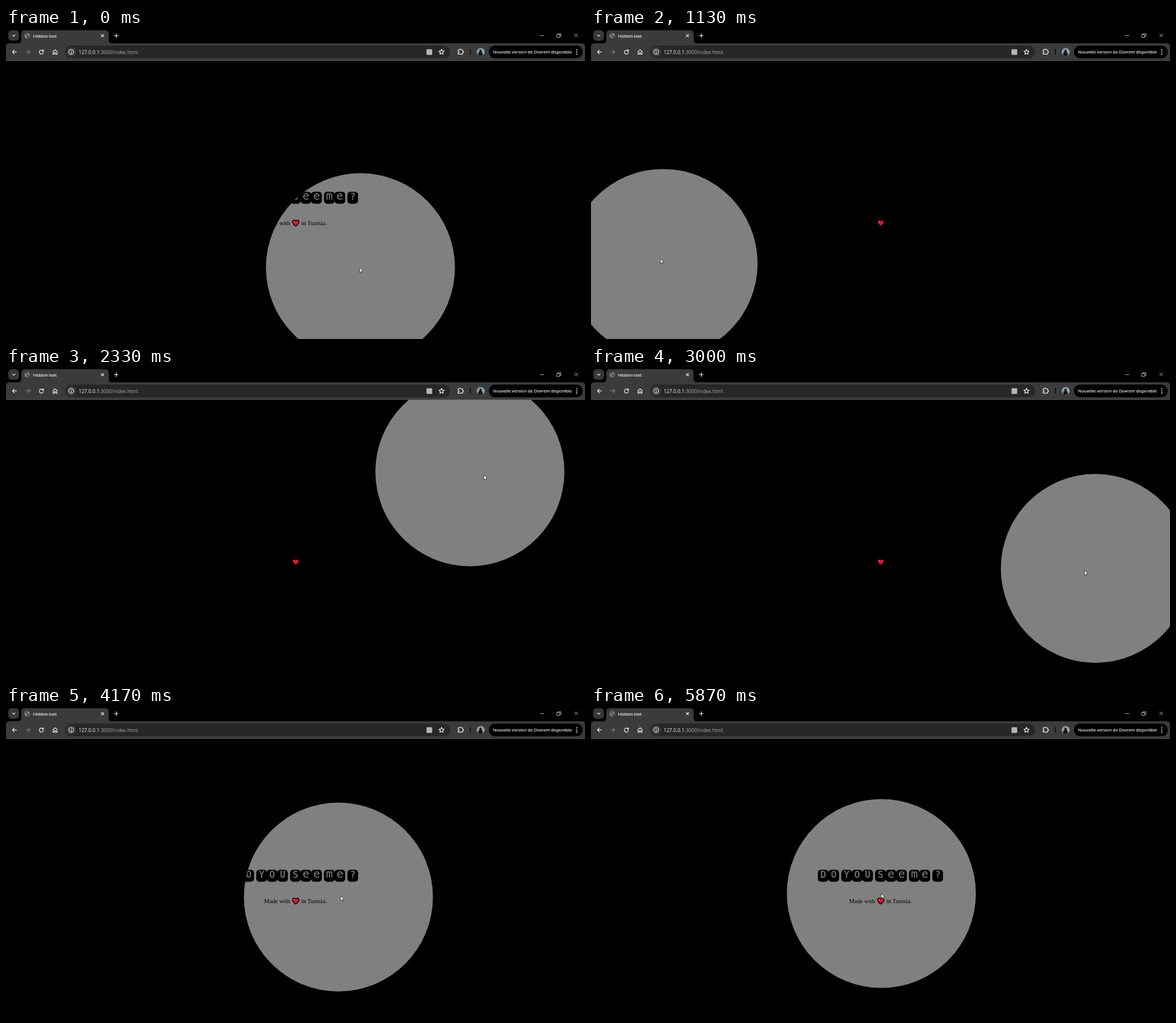
An HTML page that plays this animation: 1021 by 549 pixels, repeating every 5.91 s.

```html
<!DOCTYPE html>
<html lang="fr">
<head>
<meta charset="utf-8">
<title>Hidden-text</title>
<style>
  html, body { margin: 0; width: 100%; height: 100%; overflow: hidden; background: #000; }
  svg { display: block; }
  text { white-space: pre; }
  .ui { font-family: "Open Sans", "Noto Sans", sans-serif; font-size: 7.6px; fill: #fff; stroke: #fff; stroke-width: .15; }
  .url { font-size: 8.6px; fill: #a9acb0; stroke: none; }
  .made { font: 10.67px "Liberation Serif", serif; fill: #000; }
  .key { font: 16px "DejaVu Sans Mono", monospace; fill: #808080; stroke: #808080; stroke-width: .3; text-anchor: middle; }
  .low { font-size: 20px; stroke-width: 0; }
  .line { fill: none; stroke: #f1f1f1; stroke-width: 1.2; stroke-linecap: round; stroke-linejoin: round; }
  .thin { stroke: #ddd; stroke-width: .8; }
  .off { stroke: #7d7d7d; }
</style>
</head>
<body>
<svg width="1021" height="549" viewBox="0 0 1021 549">
  <defs>
    <clipPath id="spot"><circle id="hole" r="166.67"/></clipPath>
    <linearGradient id="photo" x2="1" y2="1">
      <stop offset="0" stop-color="#6f9a9c"/>
      <stop offset="1" stop-color="#a9a3ac"/>
    </linearGradient>
    <path id="heart" d="M511 349q-5-4-5-6.500c0-3 3.500-3.500 5-1c1.500-2.500 5-2 5 1q0 2.500-5 6.500z"/>
  </defs>

  <!-- page -->
  <rect width="1021" height="549"/>
  <g clip-path="url(#spot)">
    <rect width="1021" height="549" fill="#808080"/>
    <g id="title"></g>
    <text class="made" x="455" y="348">Made with</text>
    <text class="made" x="520.700" y="348">in Tunisia.</text>
    <use href="#heart" stroke="#000" stroke-width="2.800" stroke-linejoin="round"/>
  </g>
  <use href="#heart" fill="#e80f30"/>
  <circle cx="508.300" cy="342" r=".8" fill="#ff8fa0"/>

  <!-- tab strip -->
  <rect width="1021" height="58"/>
  <rect x="4" y="4" width="19" height="18.500" rx="6" fill="#38383a"/>
  <path class="line" d="M11.300 12.300l2.300 2.300l2.300-2.300"/>
  <path fill="#3b3b3c" d="M0 57V33q0-6 6-6h15q6 0 6-6V10q0-6 6-6h142q6 0 6 6v11q0 6 6 6h828q6 0 6 6v24z"/>
  <rect y="57" width="1021" height="1" fill="#50504a"/>
  <circle cx="37.300" cy="13.500" r="4.900" fill="#777a7e"/>
  <path fill="#333436" d="M34 11q2-2 4-1.500l-1 2l-2 1zM37 13.500l3 .500l.500 2l-2.500 1.500z"/>
  <text class="ui" x="47.800" y="16.500">Hidden-text</text>
  <path class="line" d="M168 11.300l4.400 4.400m0-4.400l-4.400 4.400"/>
  <path class="line" d="M191.200 13.500h6.600m-3.300-3.300v6.600"/>
  <path class="line thin" d="M942 13.500h6.500M971.500 11.500h5v5h-5zM973.500 11v-1h5v5h-1.500M1002.700 10.300l5.600 5.600m0-5.600l-5.600 5.600"/>

  <!-- toolbar -->
  <path class="line" d="M18.500 42.200h-7m3.200-3.300l-3.300 3.300l3.300 3.300"/>
  <path class="line off" d="M35 42.200h7m-3.200-3.300l3.300 3.300l-3.300 3.300"/>
  <path class="line" d="M65.300 40.200a3.600 3.600 0 1 0 .8 2.600M66 38.300v2.500h-2.500"/>
  <path class="line" d="M83 41.500l3.500-3l3.500 3v5h-2.300v-2.800h-2.400v2.800h-2.300z"/>
  <rect x="104" y="31" width="679" height="22.500" rx="11.250" fill="#272727"/>
  <circle cx="115" cy="42.200" r="8.500" fill="#3c3c3d"/>
  <circle class="line" cx="115" cy="42.200" r="4.200"/>
  <path class="line" d="M115 42v2.200M115 40.100v.1"/>
  <text class="ui url" x="128.300" y="45.500"><tspan fill="#f4f4f4">127.0.0.1</tspan>:3000/index.html</text>
  <rect x="741.500" y="37.500" width="10" height="10" rx="1" fill="#b4b6b9"/>
  <path class="line" id="star"/>
  <path class="line" d="M797.300 38.500h2.500q0-1.500 1.300-1.500t1.300 1.500h2.700v2.400q1.800 0 1.800 1.300t-1.800 1.300v2.700h-7.800v-2.600q1.800 0 1.800-1.300t-1.800-1.300z"/>
  <path d="M818.800 37v10" stroke="#000" stroke-width="1.300"/>
  <circle cx="837" cy="42.200" r="7" fill="url(#photo)"/>
  <path fill="#15151a" d="M832.500 47.500q0-5 3-5.500a2 2 0 1 1 2.600 0q2.700 1 2.700 5.900q-4.300 2.500-8.300-.400z"/>
  <rect x="851.500" y="31" width="165.500" height="22.500" rx="11.250"/>
  <text class="ui" x="859" y="45">Nouvelle version de Dovrem disponible</text>
  <path d="M1006.500 38.500v8" stroke="#fff" stroke-width="2.100" stroke-linecap="round" stroke-dasharray="0 3.700"/>

  <path id="cursor" d="M0 0v8.800l2-1.800l1.400 3l1.400-.600l-1.300-3h2.600z" fill="#f5f5f5" stroke="#26262c" stroke-width=".8" stroke-linejoin="round"/>
</svg>
<script>
  const LOOP = 5910, FPS = 30;
  const byId = id => document.getElementById(id);

  // Stops of the hand: tick, x, y. The spotlight trails the pointer by one tick.
  const STOPS = [
    [0, 625, 423], [19, 352, 426], [32, 140, 430], [50, 121, 233],
    [54, 190, 189.5], [70, 818, 185], [80, 905, 290], [92, 845, 361],
    [100, 335, 325], [104, 318.5, 330.7], [114, 400, 366], [126, 590, 335],
    [138, 430, 320], [146, 564.5, 358.5], [156, 680, 400], [176, 512, 331]
  ];

  // Speed at a stop follows from its neighbours; the hand rests at both ends.
  function speed(i, axis) {
    const a = STOPS[i - 1], b = STOPS[i + 1];
    return a && b ? (b[axis] - a[axis]) / (b[0] - a[0]) : 0;
  }

  // Smooth curve through the stops (cubic Hermite)
  function place(tick) {
    const t = Math.min(tick, STOPS.at(-1)[0]);
    const i = Math.max(1, STOPS.findIndex(s => s[0] >= t));
    const a = STOPS[i - 1], b = STOPS[i];
    const h = b[0] - a[0], u = (t - a[0]) / h, v = 1 - u;
    return [1, 2].map(axis =>
      a[axis] * v * v * (1 + 2 * u) + b[axis] * u * u * (3 - 2 * u) +
      h * u * v * (v * speed(i - 1, axis) - u * speed(i, axis)));
  }

  function addNode(parent, name, attrs, text = "") {
    const node = document.createElementNS("http://www.w3.org/2000/svg", name);
    for (const key in attrs) node.setAttribute(key, attrs[key]);
    node.textContent = text;
    parent.append(node);
  }

  function buildTitle() {
    let x = 400;
    for (const c of "DO YOU See me ?") {
      if (c === " ") { x += 4.1; continue; }
      addNode(byId("title"), "rect", { x, y: 289, width: 18.9, height: 21.2, rx: 5.5 });
      const cls = /[a-z]/.test(c) ? "key low" : "key";
      addNode(byId("title"), "text", { x: x + 9.6, y: 302.7, class: cls }, c);
      x += 18.55;
    }
  }

  function buildStar() {
    const points = Array.from({ length: 10 }, (_, i) => {
      const r = i % 2 ? 2.2 : 4.9, a = i * Math.PI / 5;
      return `${768 + r * Math.sin(a)} ${42.5 - r * Math.cos(a)}`;
    });
    byId("star").setAttribute("d", `M${points.join("L")}Z`);
  }

  function draw() {
    const tick = Math.floor((performance.now() % LOOP + 4) * FPS / 1000);
    const [x, y] = place(tick);
    const [px, py] = place(tick + 1);
    byId("hole").setAttribute("cx", x);
    byId("hole").setAttribute("cy", y);
    byId("cursor").setAttribute("transform", `translate(${px} ${py})`);
    requestAnimationFrame(draw);
  }

  buildTitle();
  buildStar();
  draw();
</script>
</body>
</html>
```
